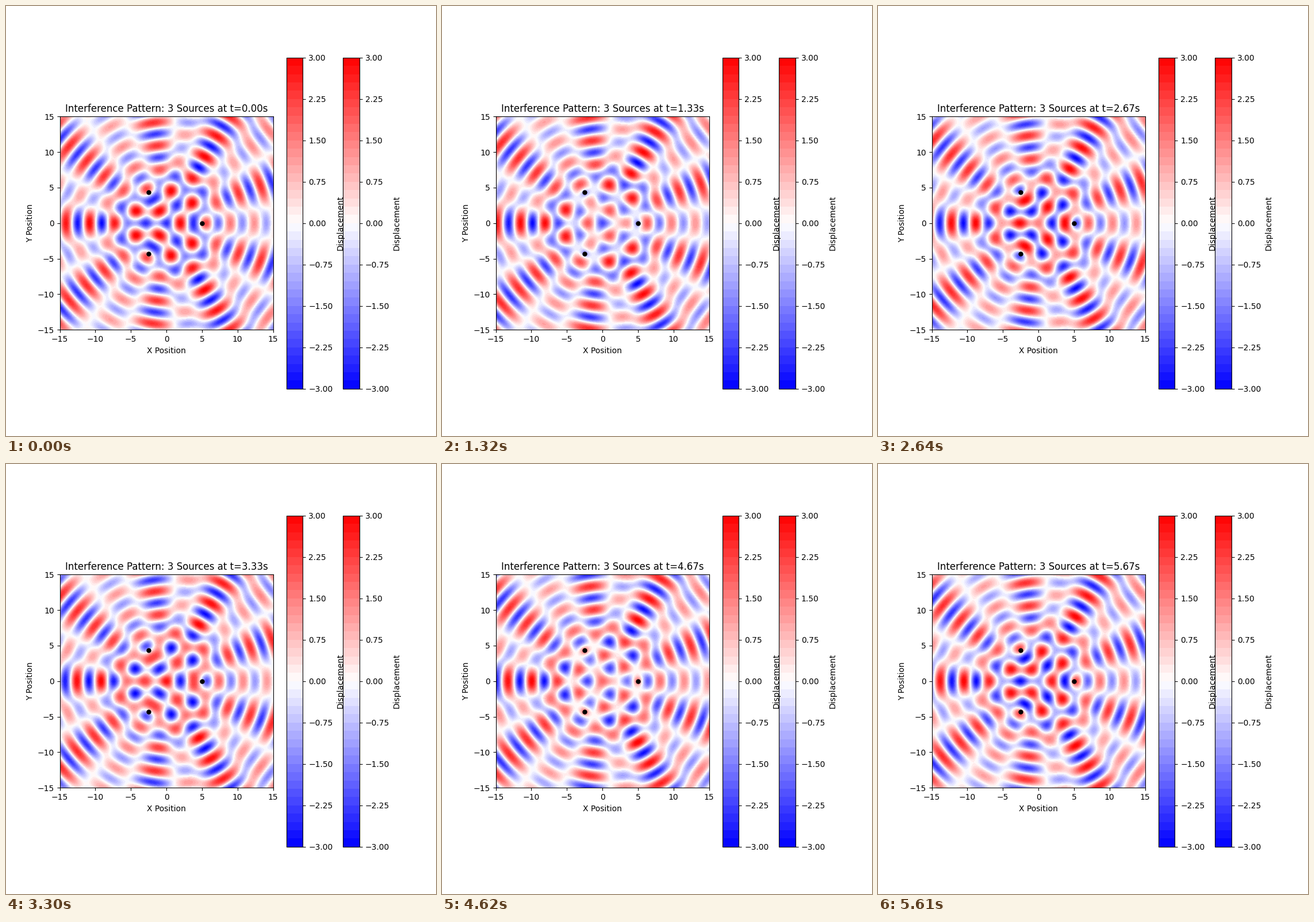
Recreate the animation shown at these times as a matplotlib script. Size 748 px wide and 748 px high, loop 5940 ms.

```python
import numpy as np
import matplotlib.pyplot as plt
from matplotlib.animation import FuncAnimation

FRAMES = 18
INTERVAL = 330       # ms
DURATION = 6.0       # simulated seconds
WAVENUMBER = 2.0
OMEGA = 1.0
N_SOURCES = 3
RADIUS = 5.0
LEVELS = np.linspace(-3, 3, 41)

angles = 2 * np.pi * np.arange(N_SOURCES) / N_SOURCES
sources = RADIUS * np.column_stack([np.cos(angles), np.sin(angles)])

axis = np.linspace(-15, 15, 200)
X, Y = np.meshgrid(axis, axis)
distances = [np.hypot(X - sx, Y - sy) for sx, sy in sources]

fig, ax = plt.subplots(figsize=(7.48, 7.48), dpi=100)
contours = None


def displacement(t):
    return sum(np.cos(WAVENUMBER * r - OMEGA * t) for r in distances)


def draw(frame):
    global contours
    if contours is not None:
        contours.remove()
    t = frame * DURATION / FRAMES
    contours = ax.contourf(X, Y, displacement(t), levels=LEVELS, cmap="bwr")
    ax.set_title(f"Interference Pattern: {N_SOURCES} Sources at t={t:.2f}s")
    return [contours]


draw(0)
ax.plot(sources[:, 0], sources[:, 1], "ko", markersize=5)
ax.set(xlim=(-15, 15), ylim=(-15, 15), aspect="equal",
       xlabel="X Position", ylabel="Y Position")
for _ in range(2):
    fig.colorbar(contours, ax=ax, label="Displacement")

anim = FuncAnimation(fig, draw, frames=FRAMES, init_func=lambda: draw(0),
                     interval=INTERVAL, repeat=True, repeat_delay=0)
plt.show()
```
